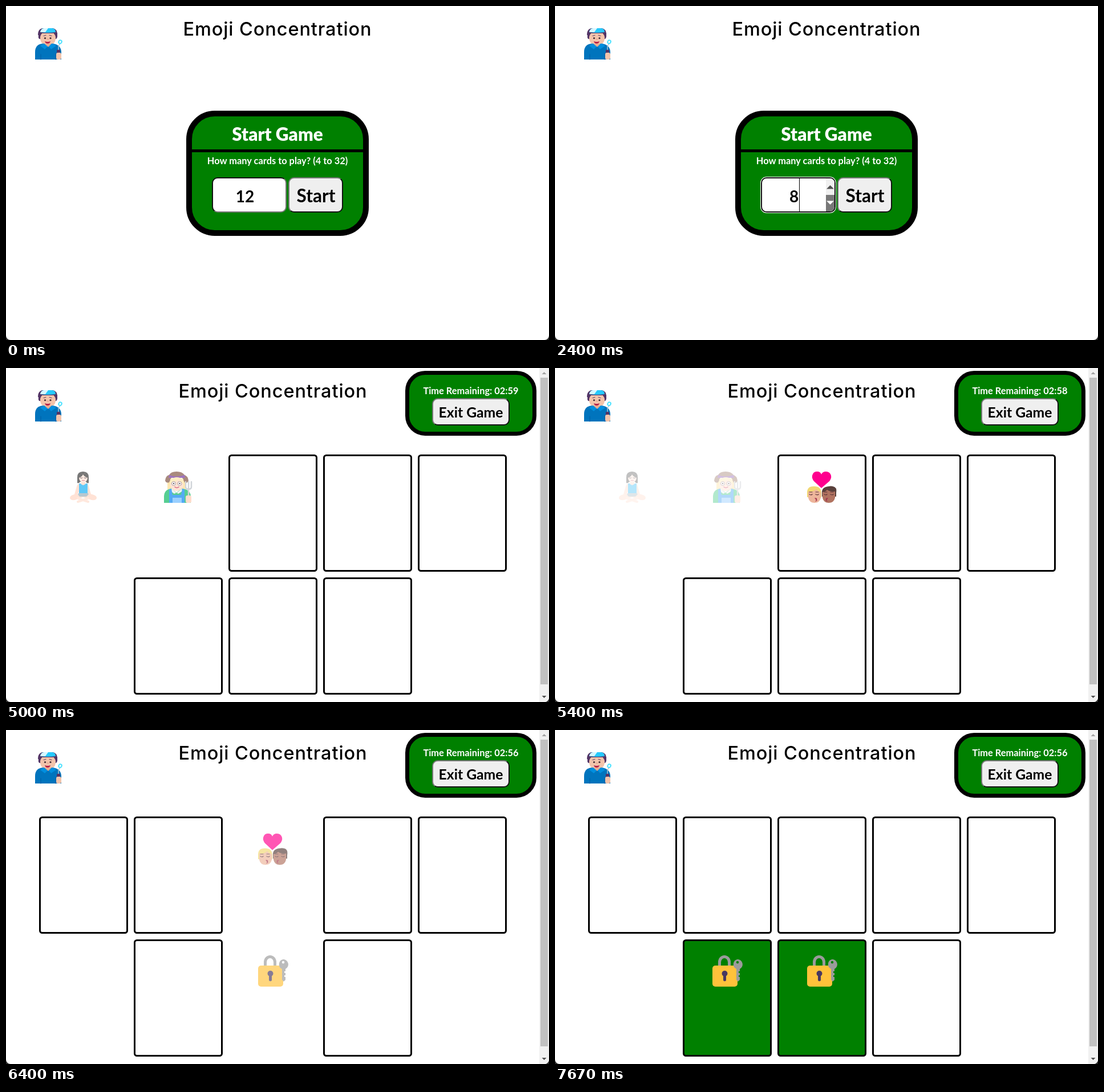
Animation, 952 px wide and 587 px high, one loop 8 s. Source, as an HTML page:

```html
<!DOCTYPE html>
<html lang="en">
<head>
<meta charset="utf-8">
<title>Emoji Concentration</title>
<style>
  html, body { margin: 0; width: 100%; height: 100%; overflow: hidden; background: #2b2b2b; }
  svg { display: block; width: 952px; height: 587px; background: #fff; border-radius: 0 0 8px 8px; }
  text { font: 700 16.4px Lato, "Open Sans", sans-serif; text-anchor: middle; }
  .title { font: 500 32.5px Inter, sans-serif; letter-spacing: .9px; }
  .panel { fill: #008000; stroke: #000; }
  .white { fill: #fff; }
  .button { fill: #efefef; stroke: url(#outset); stroke-width: 2; }
  .line { fill: none; stroke-linecap: round; }
</style>
</head>
<body>
<svg viewBox="0 0 952 587">
  <defs>
    <linearGradient id="outset" x2="1" y2="1">
      <stop offset=".5" stop-color="#767676"/><stop offset=".5" stop-color="#111"/>
    </linearGradient>
    <linearGradient id="inset" x2="1" y2="1">
      <stop offset=".5" stop-color="#111"/><stop offset=".5" stop-color="#767676"/>
    </linearGradient>
    <clipPath id="field"><rect x="363" y="303" width="127" height="58" rx="8"/></clipPath>

    <g id="welder">
      <path d="M7 9h33v7q-1 4-3 4H9q-3-1-2-6z" fill="#533566"/>
      <rect x="10" y="6" width="27" height="25" rx="12" fill="#f3c4ab"/>
      <path d="M6 13Q6 1 16 1H32Q40 2 40 13Q36 15 34 10H13Q10 15 6 13z" fill="#533566"/>
      <path d="M10 8Q11 1 17 1H31Q37 2 37 8Q24 10 10 8z" fill="#26c9fc"/>
      <path d="M10 8Q11 2 17 1h7l-5 7z" fill="#d8f7ff"/>
      <g fill="#402a32"><circle cx="18.500" cy="18.500" r="1.600"/><circle cx="28" cy="18.500" r="1.600"/></g>
      <path class="line" d="M16 14.500l4-1M26 13.500l4 1" stroke="#533566"/>
      <path d="M18 24q5 2 10 0-1 4-5 4t-5-4z" fill="#b81f46"/>
      <path class="line" d="M22.500 20q1 2 2 0" stroke="#d37a70"/>
      <path d="M1 56V43Q1 29 15 28h17q15 2 15 16v12z" fill="#0074bd"/>
      <path d="M10 32l6-4h16l6 4-9 6-5-6-6 6z" fill="#008fdf"/>
      <path d="M17 28h13l-6 6z" fill="#e9ab91"/>
      <path class="line" d="M11 47v9M37 45v11" stroke="#005ca3"/>
      <path class="line" d="M42 42V32l3-4" stroke="#b4c5d1" stroke-width="1.400"/>
      <ellipse cx="45" cy="25" rx="2.600" ry="3" fill="#fff" stroke="#50e2ff" stroke-width="2" transform="rotate(30 45 25)"/>
      <rect x="39" y="39" width="6" height="6" rx="1" fill="#533566"/>
      <rect x="38" y="44" width="9" height="12" rx="3" fill="#f3c4ab"/>
    </g>

    <g id="yogi">
      <path d="M14 20V10Q14 0 24 0t10 10v10q-3 1-5-2H19q-2 3-5 2z" fill="#464646"/>
      <path d="M21 15h7v6q5 0 6 5l4 14-4 3-4-8-2 6H19l-2-6-4 8-4-3 4-14q1-5 8-6z" fill="#ffd8c6"/>
      <ellipse cx="24.500" cy="11" rx="7.500" ry="8" fill="#ffe5d9"/>
      <path d="M16 11q0-9 9-8 7 0 8 8-6-1-9-6-2 5-8 6z" fill="#464646"/>
      <path class="line" d="M19 11q2 1.500 4 0M26 11q2 1.500 4 0" stroke="#513b42"/>
      <path class="line" d="M22.500 15.500q2 1 4 0" stroke="#d0486a"/>
      <path d="M17 21l3 0q4 6 9 0h3v17q0 4-2 6H19q-2-2-2-6z" fill="#26b4f5"/>
      <path d="M16 38h17l2 6H14z" fill="#9fb4bf"/>
      <path d="M14 39Q1 41 1 46t9 4l14-5 15 5q9 1 9-4t-13-7l-5 5H18z" fill="#ffd8c6"/>
      <path class="line" d="M15 53l18-6M33 53l-18-6" stroke="#ffe0d1" stroke-width="4"/>
    </g>

    <g id="farmer">
      <path d="M6 14h32v17q-16 5-32 0z" fill="#ffdf93"/>
      <path d="M2 16Q3 7 9 6 12 0 22 0t14 6q6 2 7 10-3 6-7 3L32 11H13L9 19q-5 2-7-3z" fill="#8a604f"/>
      <path d="M9 6q13 5 27 0l1 5H8z" fill="#7c42a8"/>
      <rect x="11" y="10" width="23" height="24" rx="11" fill="#ffd9c3"/>
      <path d="M11 21V13q10-5 23 0v8q-6-1-9-8-5 7-14 8z" fill="#ffe9ad"/>
      <g fill="#fff" stroke="#8d7176"><circle cx="17" cy="21" r="3.500"/><circle cx="27.500" cy="21" r="3.500"/></g>
      <g fill="#402a32"><circle cx="17" cy="21" r="1.300"/><circle cx="27.500" cy="21" r="1.300"/></g>
      <path class="line" d="M19 27q3.500 3 7 0" stroke="#c8325e" stroke-width="1.500"/>
      <path d="M0 55V43Q1 31 13 30l9 7 9-7q16 1 16 15v10z" fill="#19bd6b"/>
      <path d="M14 30l8 8 9-8 2 4-8 5-3-2-4 2-7-5z" fill="#e7eef2"/>
      <path d="M9 31l4-1 2 11h15l2-11 4 1v24H9z" fill="#168cf0"/>
      <rect x="15" y="46" width="16" height="9" fill="#75bfff"/>
      <path class="line" d="M38 18v9q0 4 5 4t5-4v-9M43 18v27" stroke="#c0c5cb" stroke-width="2.500"/>
      <rect x="38" y="42" width="10" height="13" rx="3" fill="#ffd0b8"/>
    </g>

    <g id="couple">
      <path d="M26 30L13 18Q9 13 10 8 12 0 19 1q5 0 7 5 2-5 8-5 7 0 9 7 1 5-3 10z" fill="#ff008e"/>
      <path d="M1 40Q0 26 14 27q11 0 12 11v8H1z" fill="#f2d873"/>
      <path d="M3 36q10 1 14-4 3 4 8 5v10q-2 9-11 9T3 47z" fill="#edb59b"/>
      <path d="M27 39q-1-11 12-12 4-1 7 0 8 1 6 12v6H27z" fill="#59403b"/>
      <path d="M28 37q5 0 8-4 6 4 14 3v11q-2 9-11 9T28 47z" fill="#b17360"/>
      <g class="line" stroke="#5a3438" stroke-width="1.200">
        <path d="M5 41q3 2 5 0M16 41q3 2 5 0M31 41q3 2 5 0M42 41q3 2 5 0M5 37h5M16 37h5M31 37h5M42 37h5"/>
      </g>
      <path class="line" d="M15 48q5 1 1 2 4 1 0 3M37 48q-5 1-1 2-4 1 0 3" stroke="#a3344d" stroke-width="1.300"/>
    </g>

    <g id="lock">
      <path class="line" d="M12.500 20v-8a8.500 9.500 0 0 1 17 0v8" stroke="#9b9b9b" stroke-width="5"/>
      <rect y="18" width="44" height="37" rx="5" fill="#ffc23b"/>
      <path d="M44 7a9 9 0 0 1 4 17v4h-2v3h2v4h-2v3h2v5l-3 3-3-3V24a9 9 0 0 1 2-17zm0 3a2.200 2.200 0 0 0 0 4.400a2.200 2.200 0 0 0 0-4.400z" fill="#9b9b9b" fill-rule="evenodd"/>
      <circle cx="21.500" cy="32" r="5" fill="#483860"/>
      <path class="line" d="M21.500 33v10" stroke="#483860" stroke-width="5"/>
    </g>
  </defs>

  <use href="#welder" x="50" y="38"/>
  <text class="title" id="title" y="52">Emoji Concentration</text>

  <g id="menu">
    <rect class="panel" x="321" y="189" width="310" height="210" rx="45" stroke-width="10"/>
    <rect x="326" y="252" width="300" height="5"/>
    <text class="white" x="476" y="237" style="font-weight:900;font-size:31.500px">Start Game</text>
    <text class="white" x="476" y="278">How many cards to play? (4 to 32)</text>
    <rect id="ring" class="white" x="360" y="300" width="133" height="64" rx="11"/>
    <rect id="input" x="362" y="302" width="129" height="60" rx="9" fill="#fff" stroke-width="2"/>
    <text id="count" x="419" y="345" style="font-size:28px"></text>
    <rect id="caret" y="303" width="1" height="58"/>
    <g id="spinner" clip-path="url(#field)">
      <rect x="475" y="303" width="15" height="29" fill="#f0f0f0"/>
      <path d="M476 321.500l6.500-6.500 6.500 6.500z" fill="#505050"/>
      <rect id="down" x="475" y="332" width="15" height="29"/>
      <path id="arrow" d="M476 342.500l6.500 6.500 6.500-6.500z"/>
    </g>
    <rect class="button" id="start" x="496" y="302" width="94" height="60" rx="9"/>
    <text x="543.500" y="345" style="font-size:31.500px">Start</text>
  </g>

  <g id="game">
    <rect class="panel" x="703.500" y="8.500" width="223" height="107" rx="31.500" stroke-width="7"/>
    <text class="white" id="clock" x="815" y="45.500"></text>
    <rect class="button" x="748" y="54" width="134" height="46" rx="9"/>
    <text x="815" y="87" style="font-size:24.700px">Exit Game</text>
    <g id="cards"></g>
    <rect x="935" width="17" height="587" fill="#f1f1f1"/>
    <rect x="937" y="17" width="13" height="539" fill="#c1c1c1"/>
    <path d="M939.500 11l4-4 4 4z" fill="#a3a3a3"/>
    <path d="M939.500 576l4 4 4-4z" fill="#505050"/>
  </g>
</svg>
<script>
const LOOP = 8000, GAME = 3260, MATCH = 7660, RESET = 1066;
const $ = id => document.getElementById(id);
const show = (el, on) => el.style.display = on ? '' : 'none';
const set = (el, name, value) => el.setAttribute(name, value);
// last value whose start time has passed
const at = (t, steps) => steps.filter(s => s[0] <= t).pop()[1];

const counts = [[0, 12], [1866, 10], [2390, 8]];
const clocks = [[0, '03:00'], [4260, '02:59'], [5260, '02:58'], [6060, '02:57'], [6260, '02:56']];
const spins = [[0, ''], [200, 'idle'], [666, 'hover'], [1066, ''], [1400, 'hover'], [1866, 'press'],
  [1933, 'hover'], [2390, 'press'], [2466, 'hover'], [2800, 'idle'], [3133, '']];
const shades = { idle: '#f0f0f0', hover: '#d2d2d2', press: '#787878' };

const cards = [
  { emoji: 'yogi', open: 4260, fade: 4730 },
  { emoji: 'farmer', open: 4730, fade: 4730 },
  { emoji: 'couple', open: 5330, fade: 6060 },
  {}, {},
  { emoji: 'lock', open: 6600, match: true },
  { emoji: 'lock', open: 6060, fade: 6060, match: true },
  {}
];

cards.forEach((card, i) => {
  const x = 58 + 166 * (i < 5 ? i : i - 4), y = i < 5 ? 152 : 368;
  $('cards').insertAdjacentHTML('beforeend',
    `<g><rect x="${x + 1.5}" y="${y + 1.5}" width="153" height="203" rx="4" stroke-width="3"/>` +
    `<use href="#${card.emoji || ''}" x="${x + (card.emoji === 'couple' ? 51 : card.emoji === 'lock' ? 52 : 53)}" ` +
    `y="${y + (i < 5 ? 30 : 28) - (card.emoji === 'couple' ? 1 : 0)}"/></g>`);
  [card.face, card.pic] = $('cards').lastChild.children;
});

function drawMenu(t) {
  const focus = t >= 1866 && t < 3133, spin = at(t, spins), count = at(t, counts);
  show($('ring'), focus);
  set($('input'), 'stroke', focus ? '#101010' : 'url(#inset)');
  $('count').textContent = count;
  show($('caret'), focus && t < 2930);
  set($('caret'), 'x', count > 9 ? 435 : 428);
  show($('spinner'), spin);
  set($('down'), 'fill', shades[spin] || 'none');
  set($('arrow'), 'fill', spin === 'press' ? '#fff' : '#505050');
  $('start').style.stroke = t >= 3133 ? 'url(#inset)' : '';
  $('start').style.fill = t >= 3133 ? '#f5f5f5' : '';
}

function drawGame(t) {
  $('clock').textContent = 'Time Remaining: ' + at(t, clocks);
  for (const { emoji, open, fade, match, face, pic } of cards) {
    const matched = match && t >= MATCH;
    const fading = t >= fade && t < fade + RESET;
    const closed = t >= fade + RESET;
    show(pic, emoji && (matched || t >= open && !closed));
    pic.style.opacity = fading ? Math.max(0, 1 - (t - fade) / 1000) : 1;
    set(face, 'fill', matched ? '#008000' : '#fff');
    set(face, 'stroke', fading ? 'none' : '#000');
  }
}

function frame(now) {
  const t = now % LOOP, playing = t >= GAME;
  set($('title'), 'x', playing ? 468 : 476);
  show($('menu'), !playing);
  show($('game'), playing);
  (playing ? drawGame : drawMenu)(t);
  requestAnimationFrame(frame);
}
frame(0);
</script>
</body>
</html>
```
